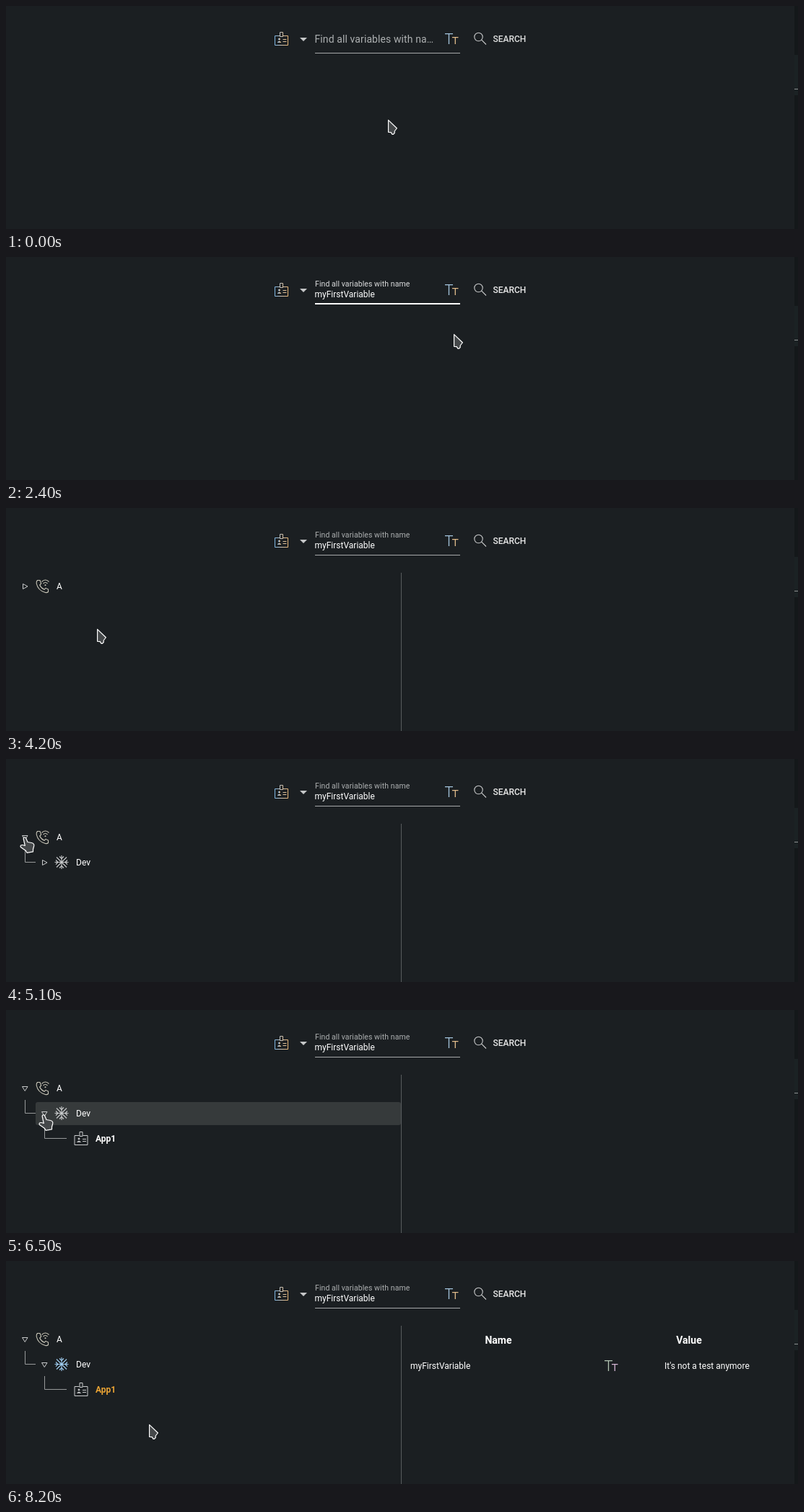
Animation of 1097x310 px, one loop 8.7 s. Source, as an HTML page:

```html
<!DOCTYPE html>
<html lang="en">
<head>
<meta charset="utf-8">
<title>Variable search</title>
<style>
html, body { margin: 0; width: 100%; height: 100%; overflow: hidden; background: #1b1f22; }
svg { display: block; width: 100%; height: 100%; font: 12px Roboto, sans-serif; fill: #fff; }
.line { fill: none; stroke: #c9cbcc; }
.head { font-size: 14px; font-weight: 700; text-anchor: middle; }
.pointer path { fill: #45484a; stroke: #fff; stroke-width: 1.2; stroke-linejoin: round; }
</style>
</head>
<body>
<svg viewBox="0 0 1097 310">
  <defs>
    <linearGradient id="tint">
      <stop offset="0" stop-color="#7fb6e2"/>
      <stop offset=".45" stop-color="#c8c4bd"/>
      <stop offset="1" stop-color="#e9b878"/>
    </linearGradient>
    <g id="badge" fill="none">
      <path d="M7 5.5H.5V18.5H18.5V5.5H12M7.500 .5h4v6h-4zM11.500 10.500h5M11.500 13.500h5"/>
      <circle cx="6.500" cy="10" r="1" fill="#ddd"/>
      <path d="M4 14.500q2.500-3 5 0z" fill="#ddd" stroke-width=".7"/>
    </g>
    <g id="flake" class="arm" fill="none" stroke-width="1.1">
      <path d="M-9.500 0H9.500M0-9.500V9.500M-7-7 7 7M-7 7 7-7"/>
      <path d="M-3-8 0-5 3-8M-3 8 0 5 3 8M-8-3-5 0-8 3M8-3 5 0 8 3"/>
    </g>
  </defs>
  <rect width="1097" height="310" fill="#1b1f22"/>
  <rect x="1092" width="5" height="310" fill="#14181a"/>
  <rect x="1092" y="68" width="5" height="56" fill="#1b2224"/>
  <rect x="1092" y="115" width="5" height="1" fill="#8d9091"/>

  <rect id="button" x="641" y="26" width="83" height="40" rx="3" fill="#414243"/>
  <use href="#badge" x="372" y="36" stroke="url(#tint)"/>
  <path d="M407 44h10l-5 5z" fill="#c6c8c9"/>
  <text id="label" letter-spacing=".1"></text>
  <text id="value" x="427.500" y="56">myFirstVariable</text>
  <rect id="caret" y="46" width="1" height="13"/>
  <rect x="428" y="65" width="201" height="1" fill="#a6a8a9"/>
  <rect id="focus" y="64" height="2"/>
  <g fill="none" stroke-width="1.3">
    <path d="M608 38.700h11M613.500 38.500v14.500" stroke="#a5c5de"/>
    <path d="M618 43.700h8.500M622.300 43.500v9.500" stroke="#e2bd8c"/>
  </g>
  <g class="line" stroke-width="1.1"><circle cx="654.500" cy="43" r="5.700"/><path d="M658.700 47.200 665 53.500"/></g>
  <text id="search" x="674.500" y="50" font-weight="500">SEARCH</text>

  <g id="results">
    <path d="M547.500 90V310" stroke="#575b5d"/>
    <g fill="#3b3e40">
      <rect id="rowA" x="14" y="93" width="533" height="32" rx="3"/>
      <rect id="rowDev" x="41" y="128" width="506" height="32" rx="3"/>
      <rect id="rowApp" x="88" y="163" width="459" height="32" rx="3"/>
    </g>
    <path id="arrowA" class="line"/>
    <g class="line" stroke-width="1.1" style="stroke:#c9c6b8">
      <path d="M43.500 100.500h3.500l1.700 4.500-2 2q2 4.500 6.300 6.300l2-2 3.500 1.700v3.500q-1.500 1.500-4 1-10-2.500-12.300-12.500-.4-3 1.300-4.500z"/>
      <path d="M49.500 102.500q5-5 10 0M51.500 105q3-3 6 0"/>
      <circle cx="54.500" cy="107.300" r=".5"/>
    </g>
    <text x="70" y="113">A</text>
    <g id="dev">
      <path d="M26.500 125V143.500H41" class="line" style="stroke:#97999a"/>
      <path id="arrowDev" class="line"/>
      <use id="snow" href="#flake" x="77" y="143.500"/>
      <text x="97" y="148">Dev</text>
    </g>
    <g id="app">
      <path d="M53.500 160V178.500H84" class="line" style="stroke:#97999a"/>
      <use href="#badge" x="94.500" y="169" stroke="#c9cbcc"/>
      <text id="appName" x="124" y="183" font-weight="700">App1</text>
    </g>
    <g id="table">
      <text class="head" x="682" y="115">Name</text>
      <text class="head" x="946" y="115">Value</text>
      <text x="560" y="150">myFirstVariable</text>
      <g fill="none" stroke-width="1.3">
        <path d="M829 138.700h11M834.500 138.500v14.500" stroke="#b4c6b4"/>
        <path d="M839 143.700h8.500M843.300 143.500v9.500" stroke="#d3b5d3"/>
      </g>
      <text x="912" y="150">It's not a test anymore</text>
    </g>
  </g>

  <g id="pointer" class="pointer">
    <path id="arrow" d="M.6 .6 12.400 12 9.200 16V18.500L7.500 20.400H6L4.200 17.600.6 17.300z"/>
    <g id="hand" transform="translate(-7 -1)">
      <path d="M5.200 3Q5-.2 8.300 1.300L11 7.500 16.500 8.500Q20.500 9.500 19.700 13L18.500 17.500V20.800L10 22.300 8.500 19.500 1.300 14.500Q.2 11.300 4 11.500L7.300 12.500z"/>
    </g>
    <g id="beam" fill="none">
      <path d="M-3-7H3M-3 7H3M0-7V7" style="stroke:#050606;stroke-width:3.500"/>
      <path d="M-3-7H3M-3 7H3M0-7V7" style="stroke-width:1.500"/>
    </g>
    <g id="stop">
      <circle r="11"/>
      <circle r="8.200" fill="none" stroke="#dc3a34" stroke-width="2.800"/>
      <path d="M-6.500 3.500 6.500-3.500" style="stroke:#dc3a34;stroke-width:4"/>
    </g>
  </g>
</svg>
<script>
const LOOP = 8700;
const $ = id => document.getElementById(id);
const set = (id, attrs) => {
  for (const key in attrs) $(id).setAttribute(key, attrs[key]);
};
const show = (id, on) => set(id, { visibility: on ? "inherit" : "hidden" });
const ramp = (t, from, to) => Math.min(1, Math.max(0, (t - from) / (to - from)));
const mix = (a, b, k) => a + (b - a) * k;

// Pointer route: time, x, y
const route = [
  [400, 529, 158], [800, 525, 112], [1200, 518, 55], [1900, 518, 55],
  [2000, 522, 62], [2300, 590, 116], [2500, 650, 98], [2800, 708, 49],
  [3700, 708, 49], [3800, 680, 68], [4000, 390, 146], [4200, 126, 168],
  [4400, 52, 140], [4600, 28, 114], [4700, 26, 109], [5500, 26, 109],
  [6000, 50, 145], [6500, 52, 146], [7000, 148, 177], [7300, 148, 177],
  [7400, 154, 184], [7800, 198, 227]
];

function pointerAt(t) {
  const i = route.findIndex(stop => stop[0] > t);
  if (i === 0) return route[0].slice(1);
  if (i < 0) return route[route.length - 1].slice(1);
  const [a, b] = [route[i - 1], route[i]];
  const k = ramp(t, a[0], b[0]);
  return [mix(a[1], b[1], k), mix(a[2], b[2], k)];
}

function pointerShape(t, y) {
  if (t < 2700) return y < 66 ? "beam" : "arrow";
  if (t < 3800) return "stop";
  return t >= 4700 && y < 195 ? "hand" : "arrow";
}

const triangle = (x, y, open) => open
  ? `M${x - 4} ${y - 2.5}h7.500l-3.750 6z`
  : `M${x - 3} ${y - 3.5}v7l6.500-3.500z`;

function drawField(t) {
  const up = ramp(t, 1200, 1400);
  const focused = t >= 1200 && t < 3300;
  $("label").textContent = "Find all variables with na" + (t < 1200 ? "…" : "me");
  set("label", {
    transform: `translate(${mix(427.5, 428, up)} ${mix(51, 41, up)}) scale(${mix(1, .75, up)})`,
    "font-size": 14,
    fill: focused ? "#dcddde" : "#adb0b1"
  });
  const half = 100.5 * (t < 3300 ? up : .8 * (1 - ramp(t, 3300, 3500)));
  set("focus", { x: 528.5 - half, width: 2 * half });
  show("value", t >= 1600);
  show("caret", t >= 1300 && t < 2100);
  set("caret", { x: t < 1600 ? 428 : 512 });
  show("button", t >= 3300 && t < 3900);
  set("search", { fill: t < 1300 ? "#dedfdf" : "#e8e8e8" });
}

function drawTree(t) {
  show("results", t >= 3500);
  show("dev", t >= 5100);
  show("app", t >= 6300);
  show("table", t >= 7200);
  set("arrowA", { d: triangle(26.5, 109, t >= 5000) });
  set("arrowDev", { d: triangle(53.5, 144, t >= 6200) });
  set("rowA", { opacity: ramp(t, 5500, 5700) * (1 - ramp(t, 5900, 6300)) * .85 });
  set("rowDev", { opacity: ramp(t, 5700, 6000) * (1 - ramp(t, 6700, 7050)) * .87 });
  set("rowApp", { opacity: t < 7300 ? ramp(t, 6700, 7000) : 0 });
  set("snow", { stroke: t < 7400 ? "#c9cbcc" : "#9fcdf0" });
  set("appName", { fill: t < 7200 ? "#fff" : "#eba434" });
}

function draw(time) {
  const t = Math.floor(time % LOOP / 100) * 100;
  drawField(t);
  drawTree(t);
  const [x, y] = pointerAt(t);
  const shape = pointerShape(t, y);
  set("pointer", { transform: `translate(${x} ${y})` });
  for (const id of ["arrow", "hand", "beam", "stop"]) show(id, id === shape);
}

const start = performance.now();
(function tick() {
  draw(performance.now() - start);
  requestAnimationFrame(tick);
})();
</script>
</body>
</html>
```
